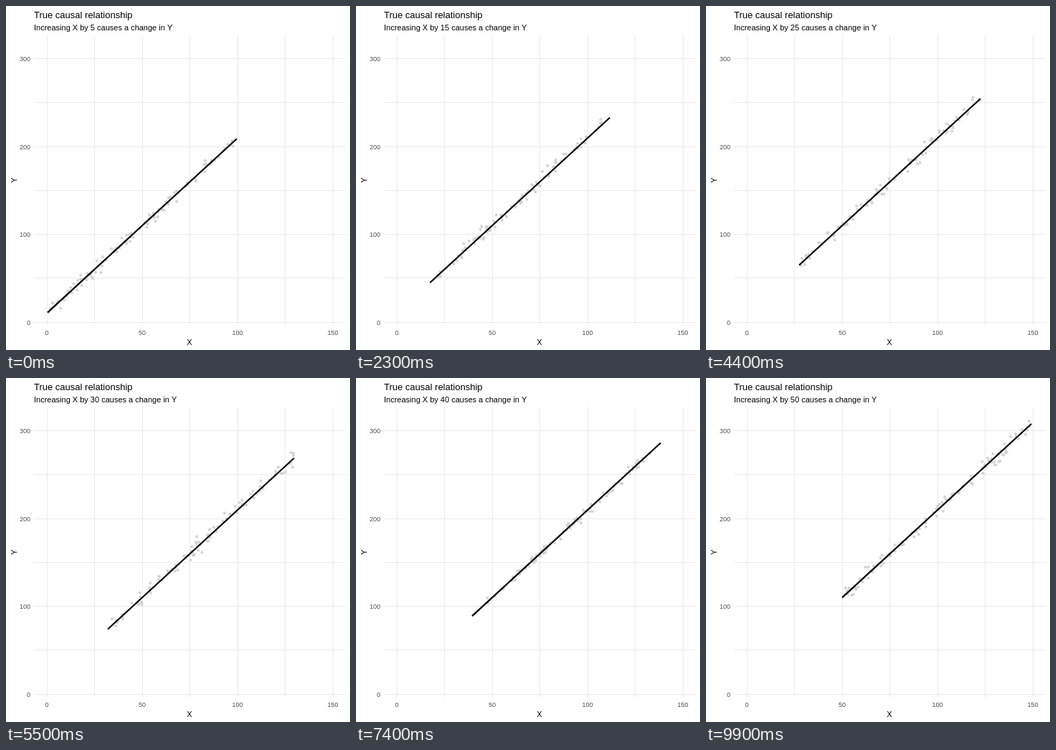
Animation, 480 px wide and 480 px high, one loop 10 s. Source, as an HTML page with a canvas:

```html
<!DOCTYPE html>
<html lang="en">
<head>
<meta charset="utf-8">
<title>True causal relationship</title>
<style>
  html, body { margin: 0; height: 100%; overflow: hidden; background: #fff; }
  canvas { display: block; }
</style>
</head>
<body>
<canvas id="stage" width="480" height="480"></canvas>
<script>
const ctx = document.getElementById('stage').getContext('2d');
const COUNT = 100, STEPS = 11, FRAMES = 100, FRAME_MS = 100;

// Where the data of each state begins and ends along x
const starts = [58, 85, 102, 116, 130, 142, 154, 165, 179, 190];
const ends = [322, 343, 353, 366, 383, 402, 415, 429, 441, 454];

const trend = x => 428.5 - 0.918 * (x - 57);
const lerp = (a, b, k) => a + (b - a) * k;

let seed = 7;
function random() {
  seed = (seed * 1664525 + 1013904223) % 4294967296;
  return seed / 4294967296;
}

// Uniform along x, roughly normal around the trend
const clouds = starts.map((start, state) => Array.from({ length: COUNT }, () => {
  const x = lerp(start, ends[state], random());
  const noise = (random() + random() + random() - 1.5) * 11;
  return { x, y: trend(x) + noise };
}));

function text(str, x, y, size, color = '#000', align = 'left') {
  ctx.font = size + 'px "Liberation Sans", Arial, sans-serif';
  ctx.fillStyle = color;
  ctx.textAlign = align;
  ctx.fillText(str, x, y);
}

function drawAxes() {
  ctx.fillStyle = '#ebebeb';
  for (let i = 0; i < 7; i++) {
    ctx.fillRect(Math.floor(57 + i * 66.5), 41, 1, 404);
    ctx.fillRect(39, Math.floor(441.2 - i * 61.28), 435, 1);
  }
  for (let i = 0; i < 4; i++) {
    text(i * 50, 57 + i * 133, 459, 9, '#4d4d4d', 'center');
    text(i * 100, 34, 445 - i * 122.7, 9, '#4d4d4d', 'right');
  }
  text('X', 256, 473, 11, '#000', 'center');
  ctx.save();
  ctx.translate(15, 243);
  ctx.rotate(-Math.PI / 2);
  text('Y', 0, 0, 11, '#000', 'center');
  ctx.restore();
}

function drawPoints(state, k) {
  ctx.fillStyle = '#d3d3d3';
  clouds[state].forEach((from, i) => {
    const to = clouds[state + 1][i];
    ctx.beginPath();
    ctx.arc(lerp(from.x, to.x, k), lerp(from.y, to.y, k), 2, 0, 2 * Math.PI);
    ctx.fill();
  });
}

function drawLine(state, k) {
  const x1 = lerp(starts[state], starts[state + 1], k);
  const x2 = lerp(ends[state], ends[state + 1], k);
  ctx.strokeStyle = '#000';
  ctx.lineWidth = 2.2;
  ctx.beginPath();
  ctx.moveTo(x1, trend(x1));
  ctx.lineTo(x2, trend(x2));
  ctx.stroke();
}

function draw(frame) {
  const progress = frame / STEPS;
  const state = Math.min(Math.floor(progress), starts.length - 2);
  const amount = 5 + 5 * Math.round(progress);
  ctx.fillStyle = '#fff';
  ctx.fillRect(0, 0, 480, 480);
  drawAxes();
  text('True causal relationship', 39, 17, 13);
  text(`Increasing X by ${amount} causes a change in Y`, 39, 34, 11);
  drawPoints(state, progress - state);
  drawLine(state, progress - state);
}

function tick() {
  draw(Math.floor(performance.now() / FRAME_MS) % FRAMES);
  requestAnimationFrame(tick);
}
tick();
</script>
</body>
</html>
```
